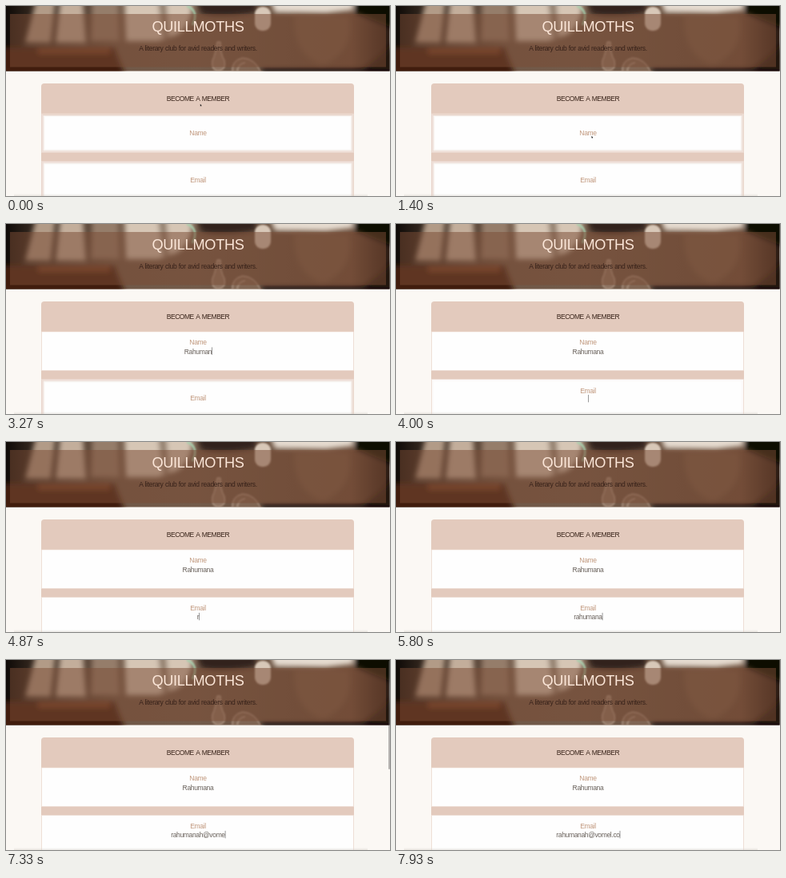
An HTML page that plays this animation: 480x238 px, repeating every 8000 ms.

```html
<!DOCTYPE html>
<html lang="en">
<head>
<meta charset="utf-8">
<title>Become a member</title>
<style>
html, body { margin: 0; width: 100%; height: 100%; overflow: hidden; background: #fbf8f4; }
svg { display: block; width: 480px; height: 238px; }
text { font: 8.5px "Liberation Sans", Arial, sans-serif; letter-spacing: -.35px; text-anchor: middle; }
.title { font-size: 18.2px; letter-spacing: -.3px; fill: #fbe6d8; }
.tagline { letter-spacing: -.3px; word-spacing: .35px; fill: #37221a; }
.heading { letter-spacing: -.48px; word-spacing: 1px; fill: #3a251b; }
.label { fill: #bf967b; }
.value { fill: #68605a; }
</style>
</head>
<body>
<svg viewBox="0 0 480 238">
  <defs>
    <linearGradient id="wall">
      <stop offset="0" stop-color="#0e0a07"/>
      <stop offset=".08" stop-color="#3a2c22"/>
      <stop offset=".3" stop-color="#705847"/>
      <stop offset=".5" stop-color="#735b4a"/>
      <stop offset=".75" stop-color="#69503f"/>
      <stop offset=".9" stop-color="#6a4c3a"/>
      <stop offset="1" stop-color="#2a1a12"/>
    </linearGradient>
    <linearGradient id="dusk" x2="0" y2="1">
      <stop offset="0" stop-color="#d5cfc9" stop-opacity="0"/>
      <stop offset="1" stop-color="#c9c2ba" stop-opacity=".4"/>
    </linearGradient>
    <filter id="soft" x="-50%" y="-50%" width="200%" height="200%"><feGaussianBlur stdDeviation="3"/></filter>
    <filter id="fine" x="-50%" y="-50%" width="200%" height="200%"><feGaussianBlur stdDeviation=".8"/></filter>
    <clipPath id="heroClip"><rect width="479.5" height="81.5"/></clipPath>
  </defs>

  <rect width="480" height="238" fill="#fbf8f4"/>
  <g clip-path="url(#heroClip)">
    <rect width="480" height="82" fill="url(#wall)"/>
    <g filter="url(#soft)">
      <path d="M-10 52H135L150 90H-10Z" fill="#3f1c0d"/>
      <path d="M40 52H130V60H40Z" fill="#713a20"/>
      <path d="M38 -8H62L56 46H24Z" fill="#b29b87"/>
      <path d="M68 -8H96L100 46H62Z" fill="#c3ae9b"/>
      <path d="M108 -8H140L142 44H106Z" fill="#957d6a"/>
      <path d="M148 -8H232Q236 20 214 36L190 44H150Z" fill="#d6c6b5"/>
      <path d="M190 -8H200L204 40H196Z" fill="#8f7c6a"/>
      <path d="M238 -8H312V8Q270 16 244 10Z" fill="#33241a"/>
      <path d="M330 -8H434V5L400 9L336 8Z" fill="#e6dcd0"/>
      <path d="M436 -10H490V30Q458 18 436 8Z" fill="#0d0906"/>
      <path d="M490 40V90H425Q462 74 490 40Z" fill="#22140d"/>
      <path d="M320 90V79H490V90Z" fill="#1a100b"/>
    </g>
    <path d="M360 12Q358 62 396 74Q436 58 428 12Z" fill="#8a6a55" fill-opacity=".45" filter="url(#soft)"/>
    <g filter="url(#fine)">
      <rect x="311" y="1" width="20" height="30" rx="9" fill="#d8c8b8"/>
      <path d="M226 0Q242 6 233 24" fill="none" stroke="#a9d0ae" stroke-width="2.5"/>
    </g>
    <g filter="url(#fine)" fill="#a98d79" fill-opacity=".5" stroke="#e2cbb8" stroke-opacity=".75">
      <path d="M264 45Q262 60 258 68Q256 80 265 82Q276 80 273 68Q268 60 268 45Z"/>
      <path d="M283 84Q281 68 296 65Q312 66 319 84" fill-opacity=".3"/>
      <path d="M289 82Q290 72 299 71" fill="none"/>
    </g>
    <rect x="5" y="10" width="470" height="66.5" fill="#7c4e36" fill-opacity=".52"/>
  </g>
  <text class="title" x="240" y="31.6">QUILLMOTHS</text>
  <text class="tagline" x="240" y="56">A literary club for avid readers and writers.</text>

  <path d="M44 238V101a4 4 0 0 1 4-4H431a4 4 0 0 1 4 4V238Z" fill="#e3cabd"/>
  <text class="heading" x="240" y="119.2">BECOME A MEMBER</text>
  <g id="fields"></g>

  <rect x="10" y="235" width="442" height="3" fill="url(#dusk)"/>
  <rect id="thumb" x="478" y="1" width="2" height="136" rx="1" fill="#555"/>
  <path id="arrow" d="M0 0V2.7L.7 2.2 1.1 3.1 1.6 2.9 1.1 2H1.9Z" fill="#111"/>
  <path id="beam" d="M-.7 0H.7M0 0V4M-.7 4H.7" stroke="#8a8a8a" stroke-width=".6"/>
</svg>
<script>
const LOOP = 8000;
const $ = id => document.getElementById(id);
const clamp = v => Math.min(1, Math.max(0, v));
const ease = v => v * v * (3 - 2 * v);
const span = (t, a, b) => ease(clamp((t - a) / (b - a)));

function add(parent, tag, attrs, text) {
  const node = document.createElementNS('http://www.w3.org/2000/svg', tag);
  for (const key in attrs) node.setAttribute(key, attrs[key]);
  if (text) node.textContent = text;
  return parent.appendChild(node);
}

function makeField(top, label, text, focusAt, blurAt, times) {
  const g = add($('fields'), 'g', {});
  add(g, 'rect', { x: 44.5, y: top, width: 390, height: 48.5, fill: '#fefefe', stroke: '#eddcd2', 'stroke-width': .6 });
  // Inset shadow as nested outlines: distance from the edge, opacity
  const inset = add(g, 'g', { fill: 'none', stroke: '#e3cabd' });
  [[.5, .6], [1.5, .8], [2.5, .35], [3.5, .1]].forEach(([d, o]) => add(inset, 'rect', {
    x: 44.5 + d, y: top + d, width: 390 - 2 * d, height: 48.5 - 2 * d, 'stroke-opacity': o
  }));
  const name = add(g, 'text', { class: 'label', x: 240, y: top + 26.9 }, label);
  const value = add(g, 'text', { class: 'value', x: 240, y: top + 27.5 });
  const caret = add(g, 'rect', { y: top + 19.4, width: .6, height: 9.4, fill: '#555' });

  return t => {
    const on = span(t, focusAt, focusAt + 180);
    inset.setAttribute('opacity', 1 - on);
    name.setAttribute('y', top + 26.9 - 10.6 * on);
    const count = times.filter(at => at <= t).length;
    value.textContent = text.slice(0, count);
    const width = count ? value.getComputedTextLength() : 0;
    caret.setAttribute('x', 240 + width / 2);
    const idle = t - (count ? times[count - 1] : focusAt);
    const lit = t >= focusAt && t < blurAt && Math.floor(idle / 530) % 2 === 0;
    caret.setAttribute('opacity', lit ? 1 : 0);
  };
}

const fields = [
  makeField(135, 'Name', 'Rahumana', 1550, 3860,
    [2530, 2670, 2800, 2930, 3070, 3170, 3260, 3400]),
  makeField(194.5, 'Email', 'rahumanah@vomel.co', 3860, LOOP,
    [4860, 5000, 5130, 5270, 5400, 5530, 5670, 5800, 5930, 6400,
     6730, 6930, 7070, 7200, 7400, 7670, 7800, 7920])
];

function draw(t) {
  fields.forEach(field => field(t));
  const move = span(t, 70, 820);
  $('arrow').setAttribute('transform', `translate(${242.8 + 1.7 * move} ${122.7 + 40 * move})`);
  $('arrow').setAttribute('opacity', t < 1600 ? 1 : 0);
  $('beam').setAttribute('transform', 'translate(244.6 160.3)');
  $('beam').setAttribute('opacity', t >= 1600 && t < 2500 ? 1 : 0);
  $('thumb').setAttribute('opacity', t < 6670 ? 0 : .8 * (1 - span(t, 7200, 7470)));
}

const start = performance.now();
function tick(now) {
  draw(Math.max(0, now - start) % LOOP);
  requestAnimationFrame(tick);
}
draw(0);
requestAnimationFrame(tick);
</script>
</body>
</html>
```
